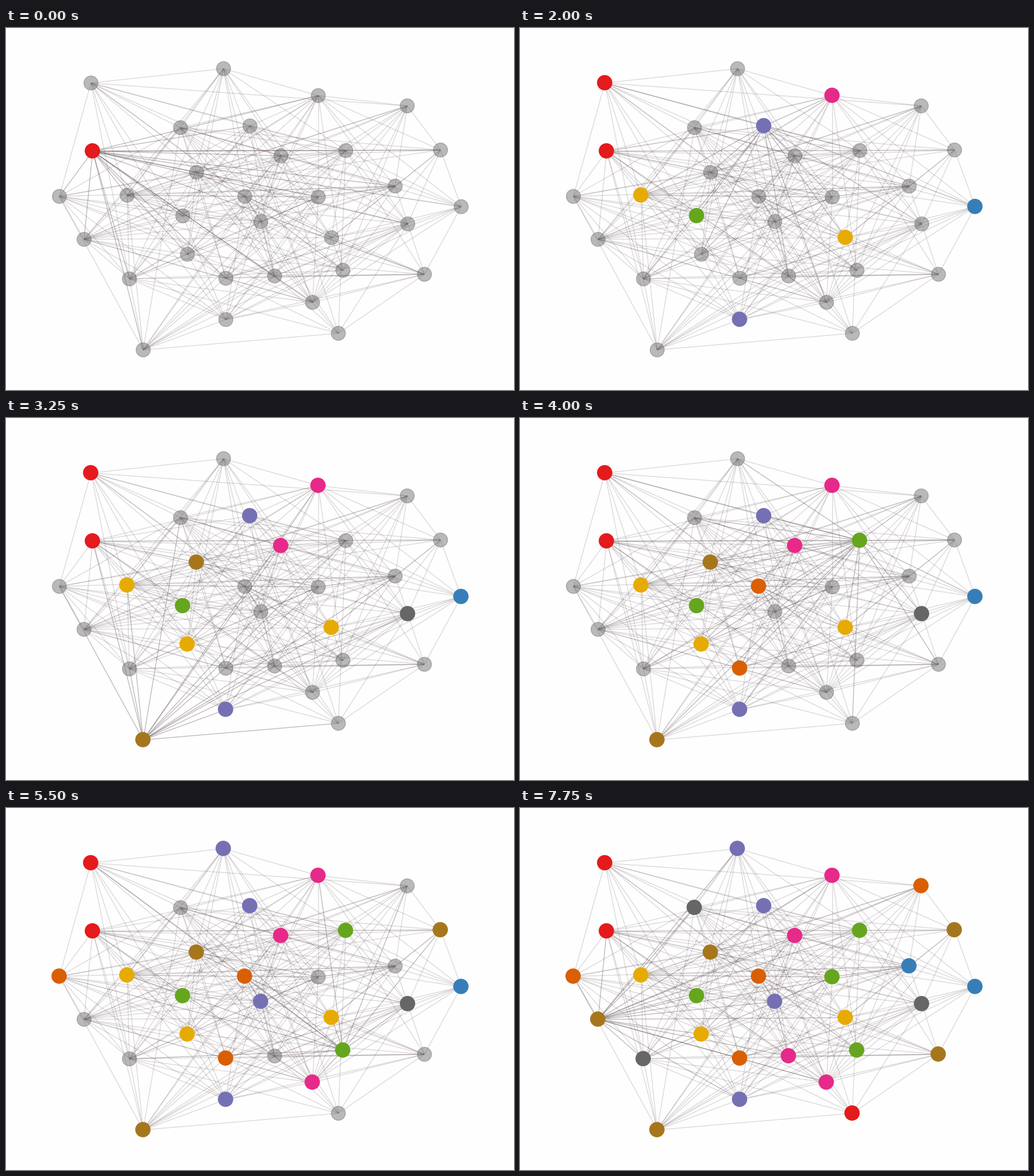
A matplotlib script that plays this animation: 885 px wide and 632 px high, repeating every 8 s.

```python
import math
import random
from itertools import combinations

import matplotlib.pyplot as plt
from matplotlib.animation import FuncAnimation
from matplotlib.collections import LineCollection
from matplotlib.patches import Circle

W, H, DPI = 885, 632, 64
PX = 72 / DPI  # points per pixel
STEP = 250

RED, BLUE, GREEN, PURPLE = "#e41a1c", "#377eb8", "#66a61e", "#7570b3"
ORANGE, PINK, YELLOW, BROWN, DARK = (
    "#d95f02", "#e7298a", "#e6ab02", "#a6761d", "#666666")

# nodes in the order they are coloured, one per step
NODES = [
    (151, 215, RED), (148, 96, RED), (793, 312, BLUE), (544, 118, PINK),
    (567, 366, YELLOW), (211, 292, YELLOW), (383, 509, PURPLE),
    (308, 328, GREEN), (425, 171, PURPLE), (316, 395, YELLOW),
    (479, 223, PINK), (332, 252, BROWN), (700, 342, DARK),
    (239, 562, BROWN), (383, 437, ORANGE), (416, 294, ORANGE),
    (592, 214, GREEN), (757, 213, BROWN), (444, 338, PURPLE),
    (379, 71, PURPLE), (93, 294, ORANGE), (534, 479, PINK),
    (587, 423, GREEN), (678, 276, BLUE), (699, 136, ORANGE),
    (729, 430, BROWN), (215, 438, DARK), (468, 433, PINK),
    (579, 533, RED), (544, 295, GREEN), (304, 174, DARK), (136, 369, BROWN),
]
RING = [19, 1, 24, 17, 2, 25, 28, 13, 20, 1]  # chain round the outside


def build_edges():
    """Outer chain plus random links, likelier between close nodes."""
    rng = random.Random(7)
    edges = [tuple(sorted(pair)) for pair in zip(RING, RING[1:])]
    for a, b in combinations(range(len(NODES)), 2):
        (xa, ya, hue_a), (xb, yb, hue_b) = NODES[a], NODES[b]
        both_outer = a in RING and b in RING
        if hue_a == hue_b or both_outer:
            continue
        if rng.random() < 0.8 - math.hypot(xa - xb, ya - yb) / 1400:
            edges.append((a, b))
    return edges


EDGES = build_edges()
LINE = (0.38, 0.31, 0.33)
IDLE_FILL, IDLE_RIM = (0.4, 0.4, 0.4, 0.45), (0.4, 0.4, 0.4, 0.4)

fig = plt.figure(figsize=(W / DPI, H / DPI), dpi=DPI, facecolor="#fefefe")
ax = fig.add_axes([0, 0, 1, 1])
ax.set_xlim(0, W)
ax.set_ylim(H, 0)
ax.axis("off")

lines = LineCollection([[NODES[a][:2], NODES[b][:2]] for a, b in EDGES],
                       linewidths=1.35 * PX, zorder=1)
ax.add_collection(lines)
dots = [ax.add_patch(Circle((x, y), 12.3, lw=1.5 * PX, zorder=2))
        for x, y, _ in NODES]


def draw(step):
    lines.set_color([LINE + (0.4 if step in e else 0.22,) for e in EDGES])
    for n, (dot, (x, y, hue)) in enumerate(zip(dots, NODES)):
        done = n <= step
        dot.set_center((x - 0.5, y - 0.5) if done else (x, y))
        dot.set_radius(12.6 if done else 12.3)
        dot.set_facecolor(hue if done else IDLE_FILL)
        dot.set_edgecolor(hue if done else IDLE_RIM)
    return [lines, *dots]


anim = FuncAnimation(fig, draw, frames=len(NODES), interval=STEP,
                     repeat=True, repeat_delay=0, blit=False)
plt.show()
```
